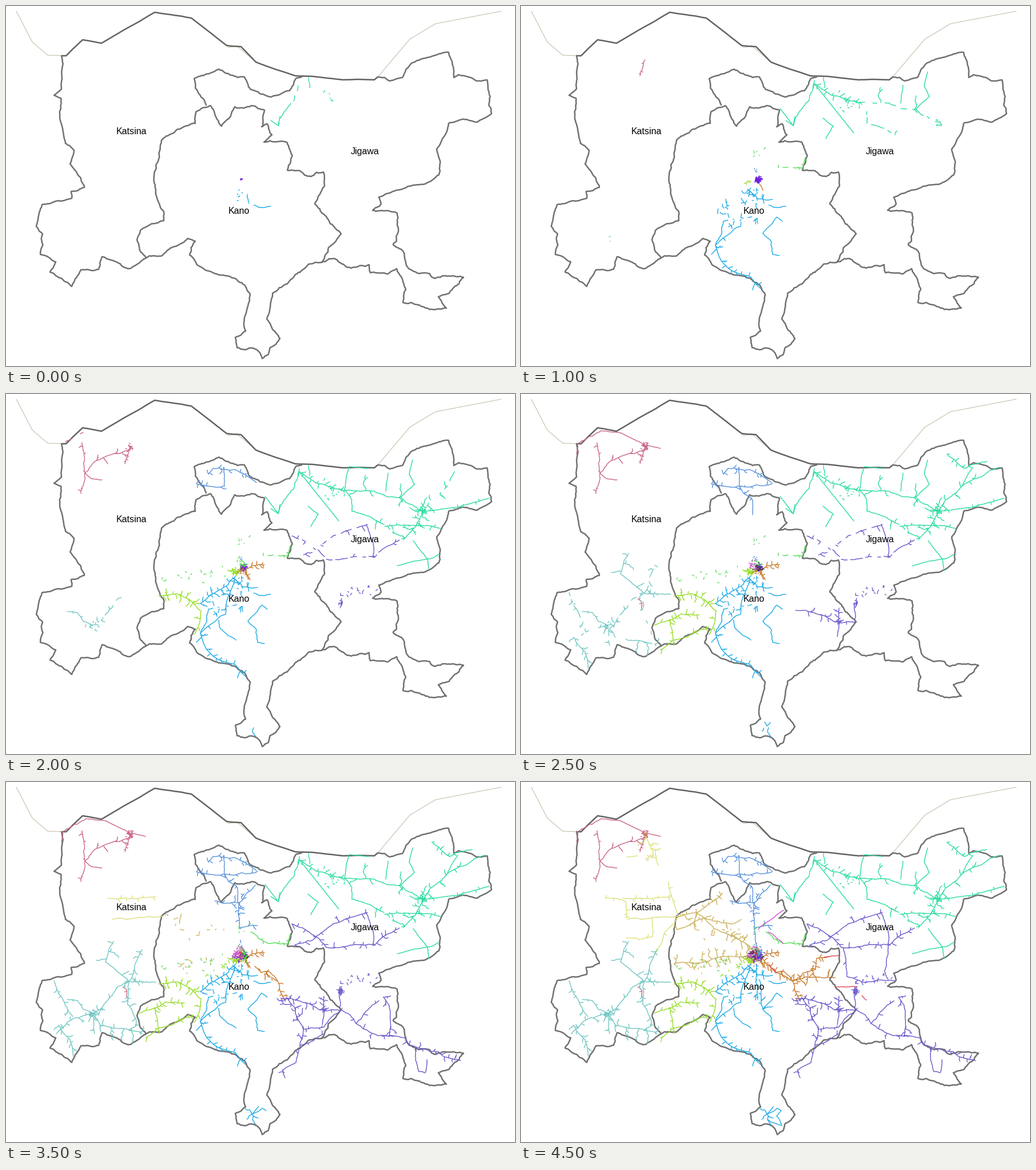
Recreate the animation shown at these times as a matplotlib script. Size 890 px wide and 629 px high, loop 5 s.

```python
import math
import random
import numpy as np
import matplotlib.pyplot as plt
from matplotlib.animation import FuncAnimation
from matplotlib.collections import LineCollection

W, H, DPI = 890, 629, 100
FRAMES, STEP_MS = 10, 500
PX = 72 / DPI
rnd = random.Random(11)

plt.rcParams["font.family"] = "Liberation Sans"
fig = plt.figure(figsize=(W / DPI, H / DPI), dpi=DPI, facecolor="white")
ax = fig.add_axes([0, 0, 1, 1])
ax.set(xlim=(0, W), ylim=(H, 0))
ax.axis("off")

TEAL, BLUE, PURPLE, VIOLET = "#2bdda0", "#1eaae6", "#6a5bcc", "#6c1fe0"
GREEN, LIME, ORANGE, PINK = "#55dd58", "#97dd2b", "#c97a2a", "#cb6788"
STEEL, AQUA, YELLOW, KHAKI = "#5a93dc", "#72c7c3", "#dde27c", "#ccb25c"
MAGENTA, RED, DARK = "#cf52d0", "#e0485c", "#3b3550"
parts = []  # (first frame, colour, points)


def rough(xy, k, step=5):
    """Fractal line through the key points: midpoints shift by k * length."""
    pts = [complex(x, y) for x, y in zip(xy[::2], xy[1::2])]
    out = pts[:1]

    def split(a, b):
        if abs(b - a) <= step:
            out.append(b)
            return
        m = (a + b) / 2 + (b - a) * 1j * rnd.gauss(0, k)
        split(a, m)
        split(m, b)

    for a, b in zip(pts, pts[1:]):
        split(a, b)
    return out


def xy_of(points):
    return np.array([(p.real, p.imag) for p in points])


def border(*xy, k=0.07, color="#707070", width=2.5):
    q = xy_of(rough(xy, k, 3.5))
    ax.plot(q[:, 0], q[:, 1], color=color, lw=width * PX, zorder=1,
            solid_joinstyle="round", solid_capstyle="round")


def road(color, t, *xy, full=None, reach=0, gap=13, k=0.05):
    """Road with side branches; starts as dashes at t, complete at full."""
    full = t if full is None else full
    q = rough(xy, k)
    start = t
    for i, piece in enumerate(zip(q, q[1:])):
        if i % 2 == 0:
            start = t if rnd.random() < 0.45 else full
        parts.append((start, color, xy_of(piece)))
    if reach < 3:
        return
    side = rnd.choice((-1, 1))
    for a, b in list(zip(q, q[1:])):
        if rnd.random() > abs(b - a) / gap:
            continue
        side = -side
        size = reach * rnd.uniform(0.3, 1)
        turn = (b - a) / abs(b - a) * np.exp(1j * side * rnd.uniform(0.8, 1.7))
        end = a + turn * size
        road(color, rnd.choice((t, full)), a.real, a.imag, end.real, end.imag,
             reach=size / 3, k=0.12)


def hub(color, t, x, y, r, n, turn=0.0, full=None, reach=10):
    """Roads fanning out from a junction."""
    for i in range(n):
        a = turn + 2 * math.pi * i / n + rnd.uniform(-0.15, 0.15)
        s = r * rnd.uniform(0.75, 1.1)
        road(color, t, x, y, x + s * math.cos(a), y + s * math.sin(a),
             full=full, reach=reach, k=0.1)


def town(color, t, x, y, r, n, size=2.5):
    """Dense short streets."""
    for _ in range(n):
        c = complex(rnd.gauss(x, r / 2), rnd.gauss(y, r / 2))
        v = size * rnd.uniform(0.3, 1) * np.exp(1j * rnd.choice((0.3, 1.9)))
        parts.append((t, color, xy_of([c - v, c + v])))


def scatter(color, t, x0, y0, x1, y1, n, size=2.5, full=FRAMES):
    """Loose dashes strewn over a slanting band."""
    for _ in range(n):
        u = rnd.random()
        c = complex(x0 + (x1 - x0) * u, y0 + (y1 - y0) * u + rnd.gauss(0, 5))
        v = size * rnd.uniform(0.2, 1) * np.exp(1j * rnd.uniform(0, math.pi))
        parts.append((t, color, xy_of([c - v, c + v])))


# National line
for line in ((18, 9, 46, 63, 73, 86, 105, 87), (324, 21, 390, 73, 403, 69, 437, 98),
             (650, 124, 706, 58, 751, 31, 866, 9)):
    border(*line, k=0, color="#bfbba4", width=1)

# State borders: north, east, south east, Kano's sides, west, enclave
border(97, 87, 105, 87, 134, 59, 167, 65, 260, 11, 324, 21, 386, 69, 411, 71, 437, 98,
       506, 122, 537, 123, 644, 129, 650, 124, k=0.008, color="#626262")
border(650, 124, 671, 131, 693, 125, 711, 99, 742, 89, 774, 81, 783, 125, 791, 120, 823, 131,
       841, 129, 849, 188, 823, 203, 775, 204, 768, 225, 753, 250, 757, 295, 652, 334, k=0.05)
border(652, 334, 656, 346, 641, 357, 684, 362, 686, 387, 677, 417, 691, 425, 706, 460, 750, 476,
       800, 474, 775, 502, 756, 508, 770, 528, 694, 518, 699, 495, 683, 459, 668, 468, 637, 466,
       635, 452, 603, 458, 578, 443, 552, 448)
border(552, 448, 564, 422, 586, 398, 556, 364, 540, 346, 557, 314, 555, 290, 533, 298, 492, 287,
       498, 270, 492, 239, 451, 238, 465, 225, 457, 206, 447, 211, 452, 182, 430, 174, 400, 176,
       377, 210, 357, 174, 332, 185, 331, 205, 272, 234, 268, 265, 261, 313, 276, 375, 235, 392,
       229, 408, 245, 440)
border(245, 440, 271, 437, 318, 406, 331, 411, 321, 435, 358, 464, 390, 472, 427, 504, 416, 556,
       419, 568, 401, 579, 404, 597, 433, 598, 448, 616, 479, 581, 456, 547, 466, 502, 504, 472,
       529, 451, 552, 448)
border(97, 87, 97, 145, 84, 156, 96, 161, 104, 240, 119, 252, 112, 276, 137, 317, 114, 324,
       115, 336, 63, 347, 53, 385, 64, 399, 60, 434, 87, 447, 77, 465, 115, 490, 131, 461,
       162, 460, 168, 438, 213, 459, 245, 440, k=0.05)
border(519, 122, 506, 128, 496, 148, 462, 159, 428, 146, 417, 124, 329, 127, 331, 143, 350, 173)

# North east
road(TEAL, 0, 529, 125, 531, 143)
road(TEAL, 0, 463, 200, 476, 209, 479, 193, k=0)
road(TEAL, 0, 513, 130, 503, 166, 476, 209, full=1)
scatter(TEAL, 0, 553, 162, 583, 164, 5)
road(TEAL, 1, 513, 136, 582, 222, k=0)
road(TEAL, 1, 453, 179, 476, 209, k=0)
road(TEAL, 1, 711, 115, 705, 140, 714, 158, 691, 180, k=0.02)
road(TEAL, 1, 668, 138, 664, 170, k=0.02)
road(TEAL, 2, 513, 136, 541, 155, 594, 168, reach=10)
road(TEAL, 2, 528, 196, 546, 210, 533, 232)
road(TEAL, 2, 594, 168, 650, 173, 690, 180, 730, 205, full=3, reach=28, gap=15)
road(TEAL, 2, 592, 168, 605, 205, 661, 228, full=3, reach=18)
road(TEAL, 3, 730, 205, 772, 160, 790, 128, full=5, reach=20)
road(TEAL, 4, 634, 130, 600, 127, 592, 168, k=0.02)
road(TEAL, 4, 730, 205, 790, 198, 845, 182, k=0.02, reach=6, gap=25)
road(TEAL, 4, 730, 205, 716, 232, 695, 255, reach=28, gap=9)
road(TEAL, 4, 662, 231, 729, 230, 760, 235, reach=8)
road(TEAL, 4, 684, 300, 745, 287, 757, 280, k=0.02)
road(TEAL, 4, 712, 256, 737, 288, 740, 308, k=0.02)
road(TEAL, 5, 772, 160, 837, 128, reach=12)
road(TEAL, 5, 745, 105, 775, 130, 815, 118, reach=12)
scatter(TEAL, 2, 546, 190, 592, 168, 10)
for t in (2, 4):
    town(TEAL, t, 730, 205, 6, 10)

# North west
road(PINK, 2, 217, 94, 213, 107, 208, 122, reach=4)
road(PINK, 3, 138, 138, 155, 118, 218, 95, reach=18, gap=20)
road(PINK, 3, 131, 174, 138, 138, 133, 85, reach=7, gap=30)
road(PINK, 4, 138, 138, 150, 148, 168, 150)
road(PINK, 4, 97, 105, 99, 87, 140, 64, full=5)
road(PINK, 5, 140, 64, 175, 68, 218, 90, 244, 95, k=0.03)
road(PINK, 5, 204, 358, 210, 362, 212, 377, reach=5)
for t in (4, 5):
    town(PINK, t, 217, 91, 7, 14)
road(YELLOW, 7, 178, 203, 225, 204, 262, 200, reach=8, gap=18)
road(YELLOW, 7, 186, 240, 230, 237, 275, 235, k=0.03)
road(YELLOW, 8, 258, 174, 275, 235, 250, 265, 235, 300, reach=8, gap=25)
road(YELLOW, 8, 184, 273, 230, 270, 230, 237, reach=8, gap=25)
road(YELLOW, 8, 185, 131, 204, 129)
road(YELLOW, 9, 148, 203, 183, 209, 184, 238, reach=8)
road(YELLOW, 9, 218, 95, 235, 120, 240, 146, reach=22, gap=8)
town(KHAKI, 8, 217, 91, 7, 6)

# South west
scatter(AQUA, 2, 155, 401, 156, 403, 2, 1.5)
road(AQUA, 3, 152, 405, 185, 374, 215, 348, full=6, reach=12)
road(AQUA, 4, 107, 380, 125, 382, 152, 405, reach=8, gap=25)
road(AQUA, 5, 188, 278, 174, 314, 215, 348, reach=22)
road(AQUA, 5, 238, 293, 215, 348, 228, 425, full=6, reach=12)
road(AQUA, 5, 215, 348, 262, 350, reach=8)
road(AQUA, 5, 92, 425, 112, 450, 118, 480, reach=12)
road(AQUA, 5, 84, 347, 92, 370, 117, 410, full=6, reach=12)
road(AQUA, 5, 88, 440, 118, 413, 152, 405, full=6, reach=14)
road(AQUA, 5, 152, 405, 165, 425, 238, 440, full=6, reach=24)
road(AQUA, 5, 152, 405, 155, 440, full=6, reach=10)
town(AQUA, 4, 152, 405, 6, 8)
town(AQUA, 6, 152, 405, 7, 14)

# Centre north
road(STEEL, 3, 333, 157, 382, 161, full=4, reach=10, gap=9)
road(STEEL, 4, 380, 128, 382, 161)
road(STEEL, 4, 354, 140, 362, 130, 400, 132, 438, 155, reach=10, gap=11)
road(STEEL, 5, 382, 161, 403, 182, 405, 211, reach=14)
road(STEEL, 5, 384, 161, 440, 156, reach=8)
road(STEEL, 6, 365, 208, 407, 211, 436, 180, reach=14)
road(STEEL, 6, 407, 211, 408, 255, 440, 251, reach=14)
road(STEEL, 6, 408, 255, 412, 297, full=8, reach=5)

scatter(KHAKI, 6, 276, 233, 326, 270, 5, 4)
road(KHAKI, 6, 306, 222, 304, 256, full=9)
road(KHAKI, 8, 368, 266, 400, 287, 410, 300, reach=18, gap=6)
scatter(KHAKI, 7, 290, 330, 395, 305, 12, 4)
scatter(KHAKI, 7, 320, 272, 390, 245, 7, 4)
road(KHAKI, 9, 272, 238, 308, 228, 350, 262, 380, 275, reach=18, gap=9)
road(KHAKI, 9, 352, 195, 328, 212, 308, 228, reach=10)
road(KHAKI, 9, 268, 318, 330, 312, 405, 303, reach=24, gap=8)
road(KHAKI, 9, 272, 258, 318, 238, 350, 246, 385, 240, reach=12)

# City fringe
road(GREEN, 2, 428, 262, 458, 282, 494, 283, 497, 265, full=7, reach=5)
scatter(GREEN, 2, 404, 258, 432, 245, 6, 2)
scatter(GREEN, 4, 268, 322, 395, 306, 16)
road(MAGENTA, 8, 415, 258, 460, 224)
road(MAGENTA, 8, 432, 262, 458, 282)
road(LIME, 4, 267, 353, 300, 349, 341, 379, 329, 420, reach=16)
road(LIME, 5, 232, 404, 258, 396, 280, 384, 312, 386, reach=12)
road(LIME, 5, 260, 394, 266, 430, 244, 447, reach=10)
road(LIME, 5, 266, 430, 290, 425, 328, 407, reach=8)
scatter(LIME, 7, 350, 340, 400, 312, 10)
road(ORANGE, 2, 417, 311, 423, 322)
road(ORANGE, 4, 416, 306, 430, 300, 452, 298, reach=9, gap=5)
road(ORANGE, 4, 418, 308, 427, 325, reach=7, gap=5)
road(ORANGE, 6, 446, 333, 460, 331, 475, 348, 488, 382, reach=14, gap=9)
road(ORANGE, 6, 420, 308, 440, 326, 475, 348, full=8, reach=12, gap=8)
road(ORANGE, 8, 475, 348, 515, 327, 517, 308, 540, 305, reach=12)
road(ORANGE, 8, 475, 348, 522, 341, 550, 342, reach=16, gap=9)

# South centre
road(BLUE, 0, 433, 348, 443, 352, 463, 350)
road(BLUE, 0, 422, 329, 425, 345)
scatter(BLUE, 0, 402, 332, 415, 322, 6, 1.5)
road(BLUE, 1, 396, 320, 415, 337, 440, 338, reach=8)
road(BLUE, 1, 457, 376, 447, 369, 423, 397, 438, 412, 440, 434, 452, 436)
road(BLUE, 1, 362, 374, 354, 376, 351, 398, 340, 418)
road(BLUE, 2, 340, 418, 357, 403, 384, 385, reach=10)
road(BLUE, 2, 340, 418, 368, 462, 402, 474, 419, 494, reach=13)
road(BLUE, 2, 340, 366, 372, 343, 402, 318, full=4, reach=14, gap=7)
road(BLUE, 2, 400, 325, 388, 355, 384, 385, full=4, reach=14)
road(BLUE, 2, 412, 318, 411, 345, 414, 380, full=9, reach=6)
scatter(BLUE, 2, 360, 380, 415, 370, 10, 4)
road(BLUE, 3, 372, 395, 375, 410, 402, 430)
road(BLUE, 4, 433, 583, 431, 590, 437, 599)
hub(BLUE, 5, 430, 580, 17, 4, turn=0.7, full=6, reach=0)
road(BLUE, 6, 432, 580, 448, 570, 455, 574)
road(BLUE, 8, 455, 574, 447, 584, 456, 600, 432, 590)
road(BLUE, 9, 440, 392, 423, 397, 416, 345, reach=10)

# South east
road(PURPLE, 3, 505, 285, 560, 257, 632, 228, full=7, reach=12, gap=18)
road(PURPLE, 3, 500, 248, 545, 272, 560, 289, full=7, reach=10, gap=18)
road(PURPLE, 3, 560, 289, 645, 285, 660, 270, 688, 255, full=7, reach=10, gap=18)
road(PURPLE, 4, 630, 228, 640, 255, 642, 286)
scatter(PURPLE, 4, 575, 350, 655, 340, 16)
road(PURPLE, 5, 480, 378, 515, 383, 560, 400, 585, 398, reach=13)
road(PURPLE, 5, 553, 424, 556, 400, 556, 374, reach=10)
road(PURPLE, 5, 583, 366, 583, 395)
road(PURPLE, 6, 488, 517, 484, 503, 507, 490, 514, 460, 555, 440, reach=8, gap=20)
road(PURPLE, 6, 514, 460, 520, 432, 505, 395, 490, 376, reach=20)
road(PURPLE, 6, 520, 432, 556, 428, 586, 398, reach=8)
road(PURPLE, 6, 586, 398, 612, 422, 650, 443, 697, 447, reach=10, gap=18)
road(PURPLE, 6, 612, 422, 640, 390, 652, 382, reach=8)
road(PURPLE, 6, 660, 376, 672, 400, 670, 445, reach=18)
road(PURPLE, 6, 697, 447, 705, 460, 740, 470, 795, 487, reach=10, gap=18)
road(PURPLE, 6, 716, 465, 722, 506, 733, 508, 736, 485)
road(PURPLE, 8, 563, 290, 570, 340, 600, 350, 655, 348, reach=8, gap=25)
road(PURPLE, 8, 642, 286, 642, 345)
for t in (4, 7):
    town(PURPLE, t, 584, 365, 6, 14)
road(RED, 8, 551, 358, 588, 358, k=0.02)
road(RED, 8, 596, 373, 604, 381)
road(RED, 8, 530, 306, 557, 303, k=0.02)
road(RED, 8, 433, 318, 446, 334)

# City core: violet centre, then ever more colours around it
town(VIOLET, 0, 412, 302, 2, 5, 1.5)
town(VIOLET, 1, 415, 304, 5, 60)
road(LIME, 2, 390, 310, 402, 306, reach=4, gap=5)
scatter(STEEL, 2, 408, 280, 413, 292, 4)
town(LIME, 3, 401, 311, 7, 30)
for i, c in enumerate((GREEN, ORANGE, MAGENTA, DARK, VIOLET, RED, GREEN, MAGENTA, STEEL, PINK, DARK, VIOLET)):
    a = 2.4 * i - 1
    town(c, 4 + i // 2, 411 + 6 * math.cos(a), 303 + 5 * math.sin(a), 9, 18, 2)

roads = LineCollection([], linewidths=1.35 * PX, zorder=2, capstyle="round")
ax.add_collection(roads, autolim=False)
for x, y, name in ((193, 224.5, "Katsina"), (603, 259.5, "Jigawa"), (389, 363, "Kano")):
    ax.text(x, y, name, fontsize=16 * PX, color="black", va="baseline", zorder=3)


def update(i):
    shown = [p for p in parts if p[0] <= i]
    roads.set_segments([p[2] for p in shown])
    roads.set_color([p[1] for p in shown])
    return (roads,)


anim = FuncAnimation(fig, update, frames=FRAMES, interval=STEP_MS,
                     init_func=lambda: update(0), repeat=True, repeat_delay=0)
plt.show()
```
